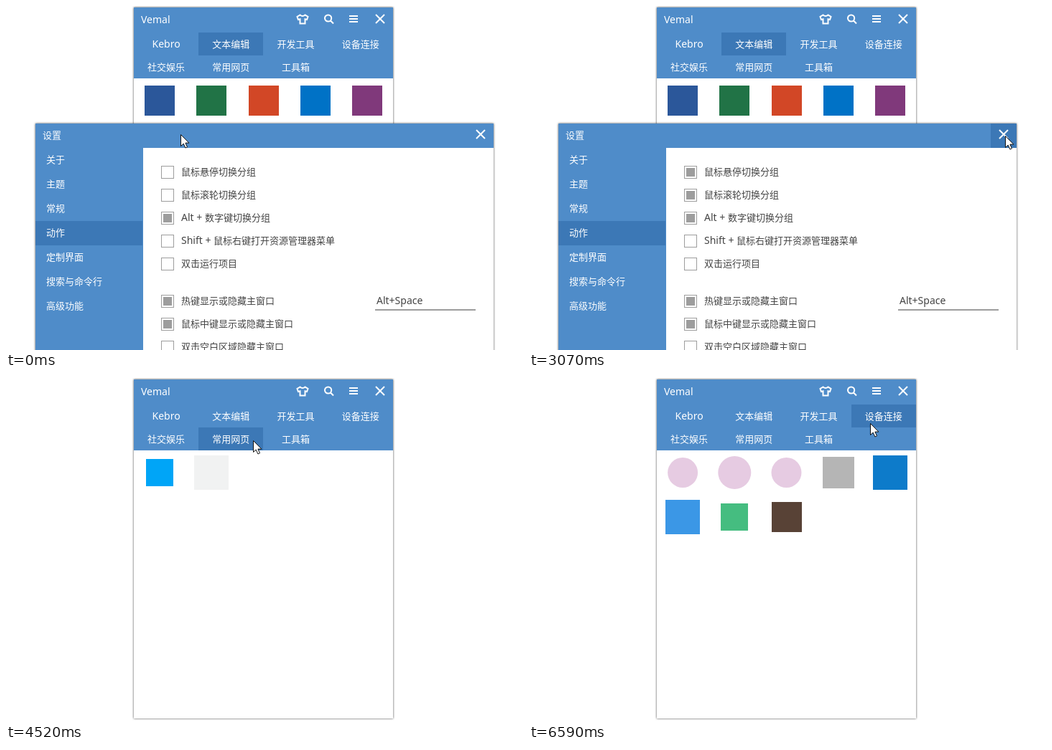
Write an HTML page that moves like this. It is 720x480 px and loops after 6.92 s.

```html
<!DOCTYPE html>
<html lang="zh-CN">
<head>
<meta charset="utf-8">
<title>启动器</title>
<style>
  html, body { margin: 0; width: 100%; height: 100%; overflow: hidden; background: #fff; }
  svg { display: block; width: 720px; height: 480px; }
  text { font: 13px "Noto Sans CJK SC", "Noto Sans CJK", sans-serif; white-space: pre; }
  .latin { font: 14px "Noto Sans", "Open Sans", sans-serif; }
  .window { filter: drop-shadow(0 0 1.5px rgba(0, 0, 0, .75)); }
  .line { fill: none; stroke: #fff; stroke-width: 2; }
</style>
</head>
<body>
<svg id="stage" viewBox="0 0 720 480"></svg>
<script>
const LOOP = 6920;
const BLUE = '#4f8cc9', DARK = '#3c78b6', GREY = '#9d9d9d';
const MAIN = { x: 178, y: 2, w: 361, h: 473, tabsY: 37, bodyY: 101 };
const TAB_W = MAIN.w / 4, TAB_H = 32, CELL_W = MAIN.w / 5, CELL_H = 62;
const CLOSE_AT = 3190, CHECK_AT = [1310, 1980];

// Icons: shape (s = square, c = circle), size, colour
const books = 's42#584236';
const palette = ['#3c8fd9', '#e0a63a', '#58a862', '#8a8f96', '#d55b4a', '#355a86'];
const swatches = (count, skip) => Array.from({ length: count },
  (_, i) => (i % 3 ? 's' : 'c') + 44 + palette[(i * 5 + (i / 5 | 0) + skip) % 6]).join(' ');

const tabs = [
  ['Kebro', swatches(8, 1)],
  ['文本编辑', `s42#2b579a s42#217346 s42#d24726 s42#0072c6 s42#80397b
    s48#3fc963 s40#9dc45c s40#91bfd2 c48#5fb888 c48#70489c ${books}`],
  ['开发工具', swatches(10, 3)],
  ['设备连接', `c42#e6cbe2 c46#e6cbe2 c42#e6cbe2 s44#b5b5b5 s48#0d7bca
    s48#3b97e6 s38#45bd80 ${books}`],
  ['社交娱乐', `s40#0a84ff c44#7cca45 c48#14304f s48#2196d3 s48#e60000
    s48#8f8cd8 s48#05080d s48#222222 c44#3fa55b`],
  ['常用网页', 's38#00a5f7 s48#f1f2f2'],
  ['工具箱', swatches(30, 0)],
].map(([name, icons]) => ({ name, icons: icons.split(/\s+/) }));

// Pointer moves: start, end, step count, then [step, x, y] waypoints
const moves = [
  [530, 1210, 7, [4, 228, 218], [6, 222, 229]],
  [1310, 1980, 7, [0, 222, 229], [5, 222, 263], [6, 222, 263]],
  [2200, 2840, 7, [3, 470, 222], [6, 661, 182]],
  [2970, 3190, 3, [1, 665, 180], [2, 665, 180]],
  [3510, 4180, 7, [3, 520, 109], [5, 430, 87], [6, 400, 90]],
  [4280, 4960, 7, [2, 344, 87], [6, 248, 80]],
  [5050, 5730, 7, [2, 232, 77], [3, 230, 66], [5, 260, 57], [6, 300, 56]],
  [5830, 6490, 7, [6, 474, 63]],
  [6590, 6590, 1, [0, 475, 63]],
];

const mix = (a, b, k) => a + (b - a) * k;

function pointOnPath(path, step) {
  const i = path.findIndex(p => p[0] >= step);
  const [a, b] = [path[i - 1], path[i]];
  const k = (step - a[0]) / (b[0] - a[0]);
  return [mix(a[1], b[1], k), mix(a[2], b[2], k)].map(Math.round);
}

function tabAt(x, y) {
  const col = Math.floor((x - MAIN.x) / TAB_W), row = Math.floor((y - MAIN.tabsY) / TAB_H);
  const inside = col >= 0 && col < 4 && row >= 0 && row < 2;
  return inside && tabs[row * 4 + col] ? row * 4 + col : -1;
}

function buildStates() {
  const states = [{ time: 0, x: 243, y: 179, tab: 1 }];
  for (const [start, end, count, ...points] of moves) {
    const last = states.at(-1);
    const path = [[-1, last.x, last.y], ...points];
    for (let i = 0; i < count; i++) {
      const time = start + Math.floor((end - start) * i / Math.max(1, count - 1) / 10) * 10;
      const [x, y] = pointOnPath(path, i);
      const hit = time >= CLOSE_AT ? tabAt(x, y) : -1;
      states.push({ time, x, y, tab: hit < 0 ? states.at(-1).tab : hit });
    }
  }
  return states;
}

const rect = (x, y, w, h, fill, extra = '') =>
  `<rect x="${x}" y="${y}" width="${w}" height="${h}" fill="${fill}" ${extra}/>`;
const label = (x, y, str, fill = '#fff', anchor = 'start') =>
  `<text x="${x}" y="${y + 5}" fill="${fill}" text-anchor="${anchor}">` +
  str.replace(/[ -~]+/g, run => `<tspan class="latin">${run}</tspan>`) + '</text>';
const line = d => `<path class="line" d="${d}"/>`;
const cross = (x, y) => line(`M${x - 6} ${y - 6}l12 12m0-12l-12 12`);

function icon(code, i) {
  const size = +code.slice(1, 3), fill = code.slice(3);
  const cx = MAIN.x + CELL_W * (i % 5 + .5), cy = MAIN.bodyY + CELL_H * (Math.floor(i / 5) + .5);
  return code[0] === 'c'
    ? `<circle cx="${cx}" cy="${cy}" r="${size / 2}" fill="${fill}"/>`
    : rect(Math.round(cx - size / 2), cy - size / 2, size, size, fill);
}

function hoverCell({ time, x, y, tab }) {
  const col = Math.floor((x - MAIN.x) / CELL_W), row = Math.floor((y - MAIN.bodyY) / CELL_H);
  const hit = time >= CLOSE_AT && row >= 0 && col >= 0 && col < 5 && tabs[tab].icons[row * 5 + col];
  return hit ? rect(MAIN.x + col * CELL_W + 1, MAIN.bodyY + row * CELL_H + 1, CELL_W - 2, CELL_H - 2,
    '#e5edf8', 'stroke="#9cc0e8" stroke-width="2"') : '';
}

function mainWindow(state) {
  const { x, y, w, h, tabsY, bodyY } = MAIN;
  const tabItem = ({ name }, i) => {
    const left = x + TAB_W * (i % 4), top = tabsY + TAB_H * Math.floor(i / 4);
    return (i === state.tab ? rect(Math.round(left), top, 90, TAB_H, DARK) : '') +
      label(left + TAB_W / 2, top + 16, name, '#fff', 'middle');
  };
  return rect(x, y, w, h, '#fff', 'class="window"') + rect(x, y, w, bodyY - y, BLUE) +
    label(188, 19, 'Vemal') +
    line('M409.5 12.5l-4 2.5 1.5 4 2.5-.7v6.2h7v-6.2l2.5.7 1.5-4-4-2.5q-3.5 3-7 0z') +
    line('M444 17a4.6 4.6 0 1 0 9.2 0a4.6 4.6 0 1 0-9.2 0M452 20.5l4 4') +
    line('M478 14h12m-12 4h12m-12 4h12') + cross(521, 18) +
    tabs.map(tabItem).join('') + hoverCell(state) + tabs[state.tab].icons.map(icon).join('');
}

const sections = ['关于', '主题', '常规', '动作', '定制界面', '搜索与命令行', '高级功能'];
const options = [
  [231, '鼠标悬停切换分组', CHECK_AT[0]], [263, '鼠标滚轮切换分组', CHECK_AT[1]],
  [295, 'Alt + 数字键切换分组', 0], [327, 'Shift + 鼠标右键打开资源管理器菜单', LOOP],
  [359, '双击运行项目', LOOP], [411, '热键显示或隐藏主窗口', 0],
  [443, '鼠标中键显示或隐藏主窗口', 0], [475, '双击空白区域隐藏主窗口', LOOP],
];

function dialog({ time, x, y }) {
  const onClose = x >= 643 && y < 198, onBody = x > 190 && y >= 198;
  const section = (name, i) =>
    (i === 3 ? rect(41, 300, 149, 34, DARK) : '') + label(56, 214 + 34 * i, name);
  const option = ([mid, name, checkedFrom]) =>
    rect(216.5, mid - 7.5, 17, 17, '#fff', `stroke="${GREY}"`) +
    (time >= checkedFrom ? rect(219, mid - 5, 12, 12, GREY) : '') + label(244, mid, name, '#444');
  return rect(41, 164, 638, 330, BLUE, 'class="window"') + rect(191, 198, 488, 282, '#fff') +
    (onClose ? rect(643, 164, 36, 34, DARK) : '') + label(51, 180, '设置') + cross(661, 179) +
    sections.map(section).join('') + options.map(option).join('') +
    label(516, 411, 'Alt+Space', '#444') + rect(514, 423, 140, 2, GREY) +
    (onBody ? rect(669, 198, 10, 282, '#8cb6e4') : '');
}

const pointer = ({ x, y }) => `<path transform="translate(${x + .5} ${y + .5})" fill="#fff"
  stroke="#111" d="M0 0V16L3.7 12.6 6.4 18.5 9 17.3 6.4 11.6H11.4Z"/>`;

const stage = document.getElementById('stage');
const states = buildStates();
let shown;

function frame() {
  const now = performance.now() % LOOP;
  const state = states.findLast(s => s.time <= now);
  if (state !== shown) {
    shown = state;
    stage.innerHTML = mainWindow(state) + (state.time < CLOSE_AT ? dialog(state) : '') + pointer(state);
  }
  requestAnimationFrame(frame);
}
frame();
</script>
</body>
</html>
```
